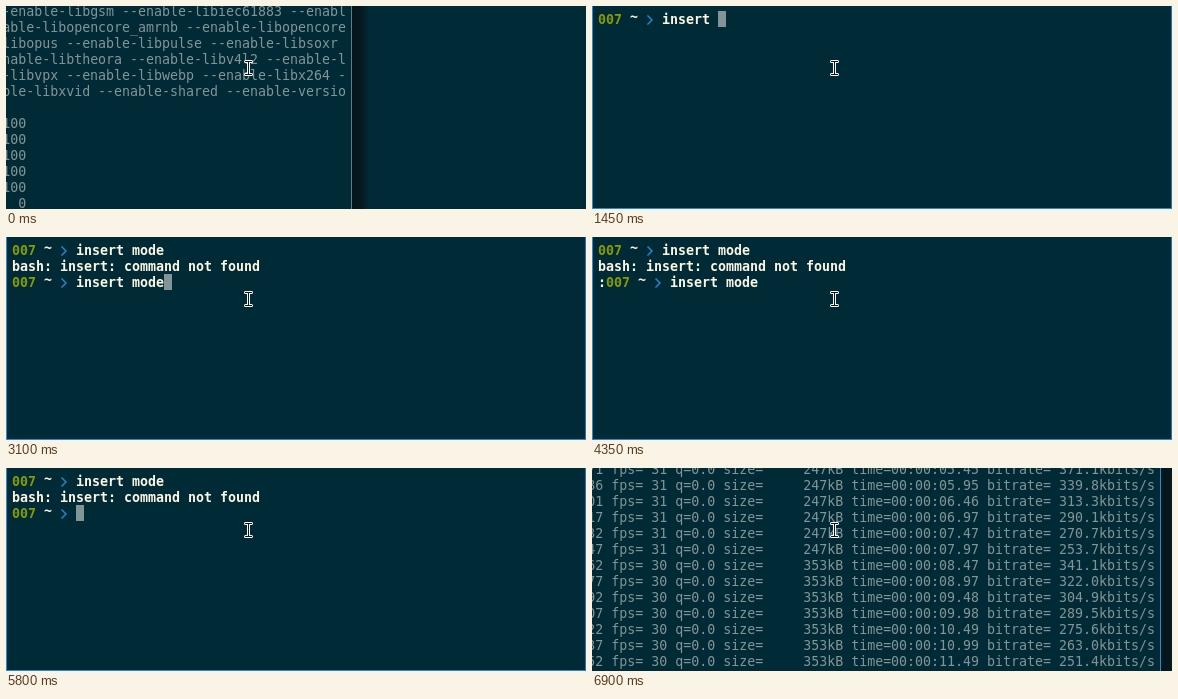
These frames come from a looping animation (580 px wide and 203 px high, 7.1 s). An HTML page:

```html
<!DOCTYPE html>
<html lang="en">
<head>
<meta charset="utf-8">
<title>Vi mode in the shell</title>
<style>
  html, body { margin: 0; width: 100%; height: 100%; overflow: hidden; background: #002b36; }
  #stage {
    position: relative; width: 580px; height: 203px; overflow: hidden; background: #002b36;
    font: 13.29px/16px "DejaVu Sans Mono", "Liberation Mono", monospace;
  }
  #stage div { white-space: pre; }
  #term, #pane, #pointer { position: absolute; inset: 0; }
  #term {
    box-sizing: border-box; padding: 6px 0 0 5px;
    border: 1px solid #268bd2; border-top: 0; border-right-color: #1f78b0;
    font-weight: bold; color: #fdf6e3;
  }
  .line { height: 16px; }
  .user { color: #859900; }
  .tilde { position: relative; top: -3px; }
  .sign { width: 8px; height: 16px; vertical-align: top; fill: none; stroke: #268bd2; stroke-width: 1.4; }
  #cursor {
    position: absolute; left: 0; top: 0; width: 8px; height: 16px; line-height: 18px;
    background: #839496; color: #002b36;
  }
  #pane {
    width: 568px; right: auto; color: #839496; background: #002b36;
    border-right: 1px solid #268bd2;
  }
  #pane::after {
    content: ""; position: absolute; left: 569px; top: 0; width: 17px; height: 203px;
    background: linear-gradient(90deg, #04151a, #06191e 55%, #002b36);
  }
  #pane.blur { border-color: #657b83; }
  .log { position: absolute; right: 5px; text-align: right; }
  #build { top: -2px; }
  #stats { top: -6px; }
</style>
</head>
<body>
<div id="stage">
  <div id="term"><div class="line" id="first"></div><div class="line" id="error"></div><div class="line" id="second"></div><div id="cursor"></div></div>
  <div id="pane"><div class="log" id="build"></div><div class="log" id="stats"></div></div>
  <svg id="pointer" width="580" height="203" fill="none" stroke-linecap="square">
    <defs><path id="beam" d="M239.5 55.5h6M242.5 55.5v13M239.5 68.5h6"/></defs>
    <use href="#beam" stroke="#fff" stroke-width="3" stroke-linecap="round"/>
    <use href="#beam" stroke="#06161b"/>
  </svg>
</div>
<script>
const LOOP = 7100, CELL = 8, LEFT = 5, TOP = 5;
const CMD = "insert mode";
const $ = id => document.getElementById(id);

// Log pane contents
const buildRows = [
  "-enable-libgsm --enable-libiec61883 --enabl",
  "able-libopencore_amrnb --enable-libopencore",
  "-libopus --enable-libpulse --enable-libsoxr ",
  "nable-libtheora --enable-libv4l2 --enable-l",
  "e-libvpx --enable-libwebp --enable-libx264 -",
  "able-libxvid --enable-shared --enable-versio",
  "",
  ...Array(5).fill("100" + " ".repeat(40)),
  "0" + " ".repeat(40)
];
const stats = [
  [171, "05.45", "371.1"], [186, "05.95", "339.8"], [201, "06.46", "313.3"],
  [217, "06.97", "290.1"], [232, "07.47", "270.7"], [247, "07.97", "253.7"],
  [262, "08.47", "341.1"], [277, "08.97", "322.0"], [292, "09.48", "304.9"],
  [307, "09.98", "289.5"], [322, "10.49", "275.6"], [337, "10.99", "263.0"],
  [352, "11.49", "251.4"]
];
const statRow = ([n, time, rate], i) =>
  `${n} fps= ${i < 6 ? 31 : 30} q=0.0 size=     ${i < 6 ? 247 : 353}kB ` +
  `time=00:00:${time} bitrate= ${rate}kbits/s`;
$("build").textContent = buildRows.join("\n");
$("stats").textContent = stats.map(statRow).join("\n");

// Pane position by time; null hides it
const slides = [[0, -223], [50, -470], [100, null], [6800, -330], [6850, -110], [6900, 0]];

// Keystrokes: time, command text, cursor column, vi command mode
const keys = [[100, "", 0]];
[850, 900, 950].forEach((t, i) => keys.push([t, CMD.slice(0, i + 1), i + 1]));
for (let i = 4; i <= CMD.length; i++) keys.push([700 + i * 100, CMD.slice(0, i), i]);
keys.push(
  [2150, "", 0],
  [3100, CMD, 11],
  [3150, CMD, 10, true],
  [4000, CMD, 7, true],
  [4100, CMD, 0, true],
  [5200, CMD, 7, true],
  [5300, CMD, 10, true],
  [5800, "", 0]
);

const at = (list, t) => list.filter(e => e[0] <= t).pop();
const sign = '<svg class="sign"><path d="M1.5 3.5L6 8L1.5 12.5"/></svg>';
const prompt = (text, vi) =>
  `${vi ? ":" : ""}<span class="user">007</span> <span class="tilde">~</span> ${sign} ${text}`;

function drawTerm(t) {
  const [since, text, col, vi] = at(keys, t);
  const entered = t >= 2150;
  $("first").innerHTML = prompt(entered ? CMD : text);
  $("error").textContent = entered ? "bash: insert: command not found" : "";
  $("second").innerHTML = entered ? prompt(text, vi) : "";
  // The cursor blinks every 250 ms after a key and stays lit when idle
  const lit = t >= 6300 || Math.floor((t - since) / 250) % 2 === 0;
  const x = LEFT + (col + (vi ? 9 : 8)) * CELL;
  const y = TOP + (entered ? 32 : 0);
  $("cursor").style.visibility = lit ? "inherit" : "hidden";
  $("cursor").style.transform = `translate(${x}px, ${y}px)`;
  $("cursor").textContent = text[col] || "";
}

function drawPane(t, x) {
  const leaving = t < 100;
  $("pane").style.transform = `translateX(${x}px)`;
  $("pane").className = leaving ? "blur" : "";
  $("build").style.display = leaving ? "block" : "none";
  $("stats").style.display = leaving ? "none" : "block";
}

let last = -1;
function draw(now) {
  const t = Math.floor(now % LOOP / 50) * 50;
  if (t === last) return;
  last = t;
  const x = at(slides, t)[1];
  const open = x === null;
  $("term").style.visibility = open ? "visible" : "hidden";
  $("pane").style.display = open ? "none" : "block";
  if (open) drawTerm(t);
  else drawPane(t, x);
}

const start = performance.now();
function tick() {
  draw(performance.now() - start);
  requestAnimationFrame(tick);
}
tick();
</script>
</body>
</html>
```
